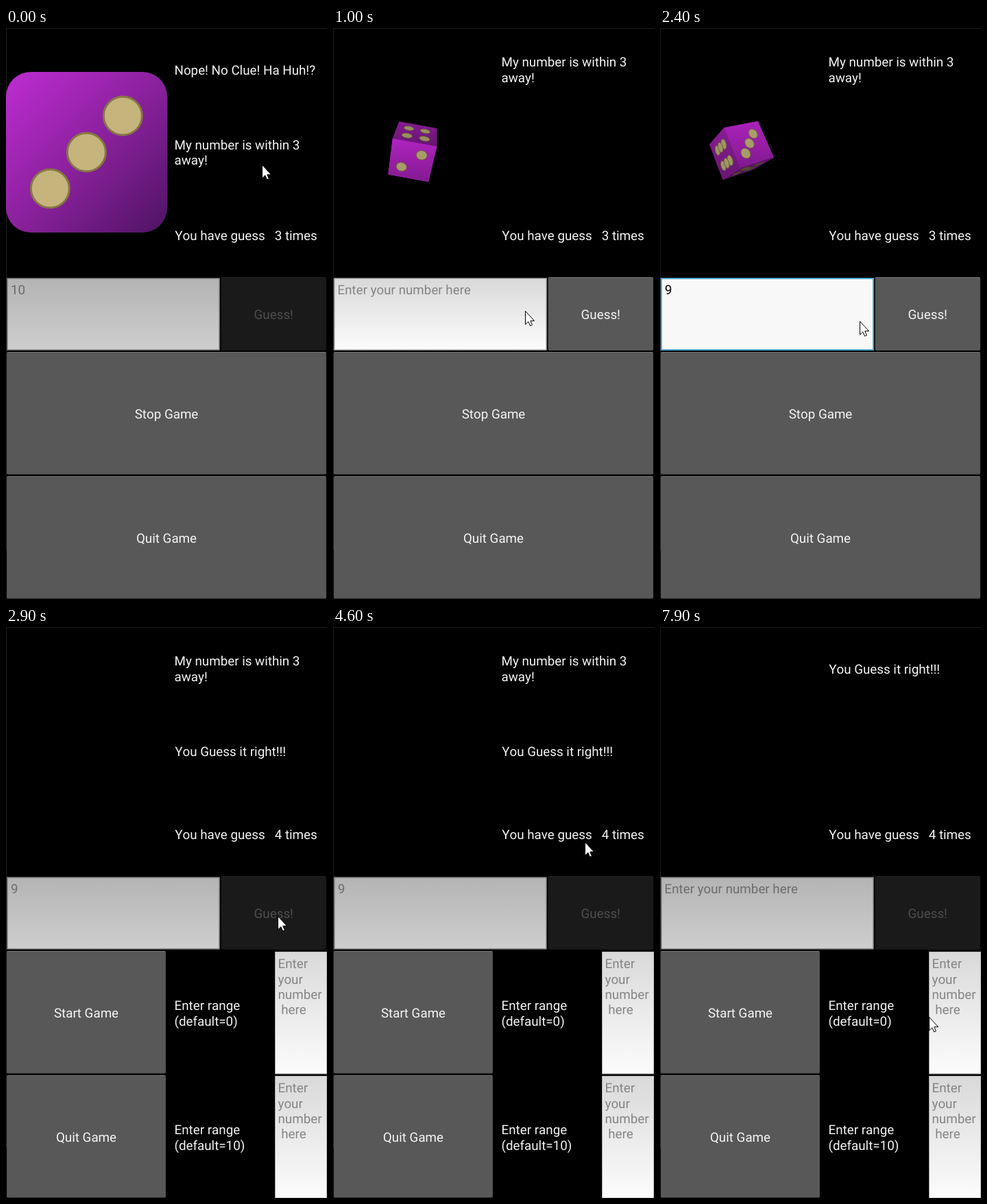
An HTML page that plays this animation: 468x832 px, repeating every 8 s.

```html
<!DOCTYPE html>
<html lang="en">
<head>
<meta charset="utf-8">
<title>Number guessing game</title>
<style>
  html, body { margin: 0; width: 100%; height: 100%; overflow: hidden; background: #000; }
  svg { display: block; width: 468px; height: 832px; }
  text { font: 18.8px Roboto, "Open Sans", sans-serif; font-kerning: none; fill: #f4f4f4; text-rendering: geometricPrecision; }
  .mid { text-anchor: middle; }
  .hint { fill: #858585; }
</style>
</head>
<body>
<svg id="stage" viewBox="0 0 468 832" xmlns="http://www.w3.org/2000/svg">
  <defs>
    <linearGradient id="field" x2="0" y2="1">
      <stop stop-color="#d9d9d9"/><stop offset="1" stop-color="#fcfcfc"/>
    </linearGradient>
    <linearGradient id="fieldOff" x2="0" y2="1">
      <stop stop-color="#b4b4b4"/><stop offset="1" stop-color="#cecece"/>
    </linearGradient>
    <linearGradient id="purple" x2="1" y2="1">
      <stop offset=".04" stop-color="#ba2bcf"/><stop offset=".5" stop-color="#8b219d"/><stop offset=".95" stop-color="#541569"/>
    </linearGradient>
    <linearGradient id="dim" x2="0" y2="1">
      <stop stop-opacity="0"/><stop offset="1" stop-opacity=".25"/>
    </linearGradient>
  </defs>
  <rect width="468" height="832"/>
  <path d="M0 .5H468M.5 0V760" stroke="#1c1c1c"/>
</svg>
<script>
const LOOP = 8000, STEP = 100;
const ROLL = 200, FOCUS = 1200, TYPED = 1500, WIN = 2900, CLEAR = 5000;
const stage = document.getElementById('stage');

function make(tag, attrs, parent = stage) {
  const el = document.createElementNS('http://www.w3.org/2000/svg', tag);
  for (const key in attrs) el.setAttribute(key, attrs[key]);
  parent.appendChild(el);
  return el;
}
const group = () => make('g', {});
const show = (el, on) => el.setAttribute('display', on ? 'inline' : 'none');

// Lines of text, centred vertically on cy
function setLines(el, lines, x, cy) {
  el.textContent = '';
  lines.forEach((line, i) => {
    const inset = line[0] === 'Y' ? .7 : 0;
    make('tspan', { x: x + inset, y: cy + 7 + 22.4 * (i - (lines.length - 1) / 2) }, el)
      .textContent = line.replace(/ /g, '\u00a0');
  });
}
function label(lines, x, cy, cls = '', parent = stage) {
  const el = make('text', { class: cls }, parent);
  setLines(el, lines, x, cy);
  return el;
}
function button(x, y, w, h, text, parent) {
  const box = make('rect', { x: x + .5, y: y + .5, width: w - 1, height: h - 1, rx: 1, fill: '#585858', stroke: '#505050' }, parent);
  const edge = make('path', { d: `M${x + 1} ${y + .5}h${w - 2}`, stroke: '#727272' }, parent);
  const caption = label([text], x + w / 2, y + h / 2 + .7, 'mid', parent);
  return { box, edge, caption };
}
function rangeRow(y, limit, parent) {
  label(['Enter range', `(default=${limit})`], 245.5, y + 89.5, '', parent);
  make('rect', { x: 392.5, y: y + .5, width: 75, height: 177.5, fill: 'url(#field)', stroke: '#b0b0b0' }, parent);
  label(['Enter', 'your', 'number', ' here'], 396.5, y + 50.7, 'hint', parent);
}

// Message area
const topMsg = make('text', {}), midMsg = make('text', {}), count = make('text', {});

// Guess row
const field = make('rect', { x: 2, y: 365, width: 309, height: 104 });
const entry = make('text', {});
const caret = make('rect', { y: 371, width: 1.6, height: 21, fill: '#c04a58' });
const guess = button(313.5, 363, 153.5, 107, 'Guess!');

// Lower panels
const playing = group(), setup = group();
button(1, 472, 466, 178.5, 'Stop Game', playing);
button(1, 653, 466, 178.5, 'Quit Game', playing);
button(1, 472, 232, 178.5, 'Start Game', setup);
button(1, 653, 232, 178.5, 'Quit Game', setup);
rangeRow(473, 0, setup);
rangeRow(654, 10, setup);

// Resting die
const flatDie = group();
make('rect', { y: 64, width: 235, height: 234, rx: 36, fill: 'url(#purple)' }, flatDie);
for (const k of [-1, 0, 1]) {
  make('circle', { cx: 117.3 + 53 * k, cy: 181 - 53 * k, r: 28, fill: '#c6b47d', stroke: '#857744', 'stroke-width': 3 }, flatDie);
}

// Rolling die: orientation keys as [time, quaternion w x y z]
const rollingDie = group();
const spins = [
  [400, [-.252, .203, .57, .758]],
  [1600, [.768, .612, -.194, -.023]],
  [2400, [.487, -.215, .854, .008]]
];
// Faces as [axis, sign, pips]
const faces = [[0, 1, 4], [0, -1, 3], [1, 1, 2], [1, -1, 5], [2, 1, 1], [2, -1, 6]];
const HALF = 28.5, EYE = 320, PIP = .25, GAP = .42;

function orientation(t) {
  const i = t < spins[1][0] ? 0 : 1;
  const [t0, a] = spins[i], [t1, b] = spins[i + 1];
  const angle = Math.acos(a.reduce((sum, v, k) => sum + v * b[k], 0));
  const u = (t - t0) / (t1 - t0);
  const q = a.map((v, k) => (v * Math.sin((1 - u) * angle) + b[k] * Math.sin(u * angle)) / Math.sin(angle));
  const len = Math.hypot(...q);
  return q.map(v => v / len);
}
function rotate([w, x, y, z], [a, b, c]) {
  const p = 2 * (y * c - z * b), q = 2 * (z * a - x * c), r = 2 * (x * b - y * a);
  return [a + w * p + y * r - z * q, b + w * q + z * p - x * r, c + w * r + x * q - y * p];
}
function project(q, point) {
  const [x, y, z] = rotate(q, point).map(v => v * HALF);
  const s = EYE / (EYE - z);
  return [(117 + x * s).toFixed(2), (178.8 - y * s).toFixed(2)];
}
function pips(n) {
  const list = n % 2 ? [[0, 0]] : [];
  if (n > 1) list.push([-1, -1], [1, 1]);
  if (n > 3) list.push([-1, 1], [1, -1]);
  if (n === 6) list.push([0, -1], [0, 1]);
  return list;
}
const shade = (rgb, k) => `rgb(${rgb.map(v => Math.round(v * k))})`;

function drawRoll(t) {
  rollingDie.textContent = '';
  const q = orientation(t);
  for (const [axis, sign, n] of faces) {
    const at = (u, v) => {
      const p = [];
      p[axis] = sign;
      p[(axis + 1) % 3] = u;
      p[(axis + 2) % 3] = v;
      return p;
    };
    const facing = rotate(q, at(0, 0))[2];
    if (facing * EYE <= HALF) continue;
    const poly = (pts, attrs) => make('polygon', { points: pts.map(p => project(q, p)).join(' '), ...attrs }, rollingDie);
    const corners = [at(-1, -1), at(1, -1), at(1, 1), at(-1, 1)];
    const body = shade([190, 38, 208], .42 + .58 * facing);
    poly(corners, { fill: body, stroke: body, 'stroke-linejoin': 'round' });
    poly(corners, { fill: 'url(#dim)' });
    const lit = .45 + .55 * Math.min(1, facing * 1.7);
    for (const [u, v] of pips(n)) {
      const ring = Array.from({ length: 20 }, (_, i) => {
        const a = i * Math.PI / 10;
        return at(u * GAP + PIP * Math.cos(a), v * GAP + PIP * Math.sin(a));
      });
      poly(ring, { fill: shade([168, 157, 104], lit), stroke: shade([112, 98, 62], lit) });
    }
  }
}

// Pointer path as [time, x, y]
const path = [
  [0, 373, 199], [400, 354, 341], [900, 303, 405], [1200, 235, 425], [1600, 230, 425],
  [1800, 236, 427], [2400, 291, 427], [2700, 396, 421], [3100, 396, 420], [4000, 396, 420],
  [4400, 343, 184], [4900, 404, 507], [5000, 415, 500], [5100, 392, 507], [5200, 392, 507],
  [5700, 413, 458], [6400, 413, 458], [6800, 364, 563], [6900, 369, 569], [7500, 369, 569],
  [7700, 382, 568], [7800, 382, 568], [7900, 392, 568]
];
const pointer = make('path', { d: 'M.5 .5V20L4.8 15.8 7.6 22 10.4 20.8 7.8 14.7H13.6Z', fill: '#fff', stroke: '#000' });

function pointerAt(t) {
  const i = path.findIndex(p => p[0] > t);
  if (i < 0) return path[path.length - 1].slice(1);
  const a = path[i - 1], b = path[i], u = (t - a[0]) / (b[0] - a[0]);
  return [1, 2].map(k => a[k] + (b[k] - a[k]) * u);
}

const near = ['My number is within 3', 'away!'], right = ['You Guess it right!!!'];

function render(t) {
  const rolling = t >= ROLL && t < WIN;
  const focused = t >= FOCUS && t < WIN;
  const typed = t < ROLL ? '10' : t >= TYPED && t < CLEAR ? '9' : '';

  setLines(topMsg, t < ROLL ? ['Nope! No Clue! Ha Huh!?'] : t < CLEAR ? near : right, 245.5, 60.5);
  setLines(midMsg, t < ROLL ? near : t >= WIN && t < CLEAR ? right : [], 245.5, 180.8);
  setLines(count, [`You have guess   ${t < WIN ? 3 : 4} times`], 245.5, 302);

  field.setAttribute('fill', focused ? '#f8f8f8' : rolling ? 'url(#field)' : 'url(#fieldOff)');
  field.setAttribute('stroke', focused ? '#4fa9cf' : rolling ? '#b0b0b0' : '#858585');
  field.setAttribute('stroke-width', focused ? 2 : 1.5);
  setLines(entry, [typed || 'Enter your number here'], typed ? 7 : 6.5, 381);
  entry.style.fill = !rolling ? '#6c6c6c' : typed ? '#000' : '#858585';
  caret.setAttribute('x', typed ? 17.3 : 7);
  show(caret, focused && (t - TYPED + 1000) % 1000 < 500);

  guess.box.setAttribute('fill', rolling ? '#585858' : '#1a1a1a');
  guess.box.setAttribute('stroke', rolling ? '#505050' : '#181818');
  guess.edge.setAttribute('stroke', rolling ? '#727272' : '#222');
  guess.caption.style.fill = rolling ? '#f4f4f4' : '#4e4e4e';

  show(playing, t < WIN);
  show(setup, t >= WIN);
  show(flatDie, t < ROLL);
  show(rollingDie, rolling);
  if (rolling) drawRoll(t);
  pointer.setAttribute('transform', `translate(${pointerAt(t).map(Math.round)})`);
}

const start = performance.now();
let last = -1;
function tick() {
  const t = Math.floor((performance.now() - start) % LOOP / STEP) * STEP;
  if (t !== last) render(last = t);
  requestAnimationFrame(tick);
}
tick();
</script>
</body>
</html>
```
